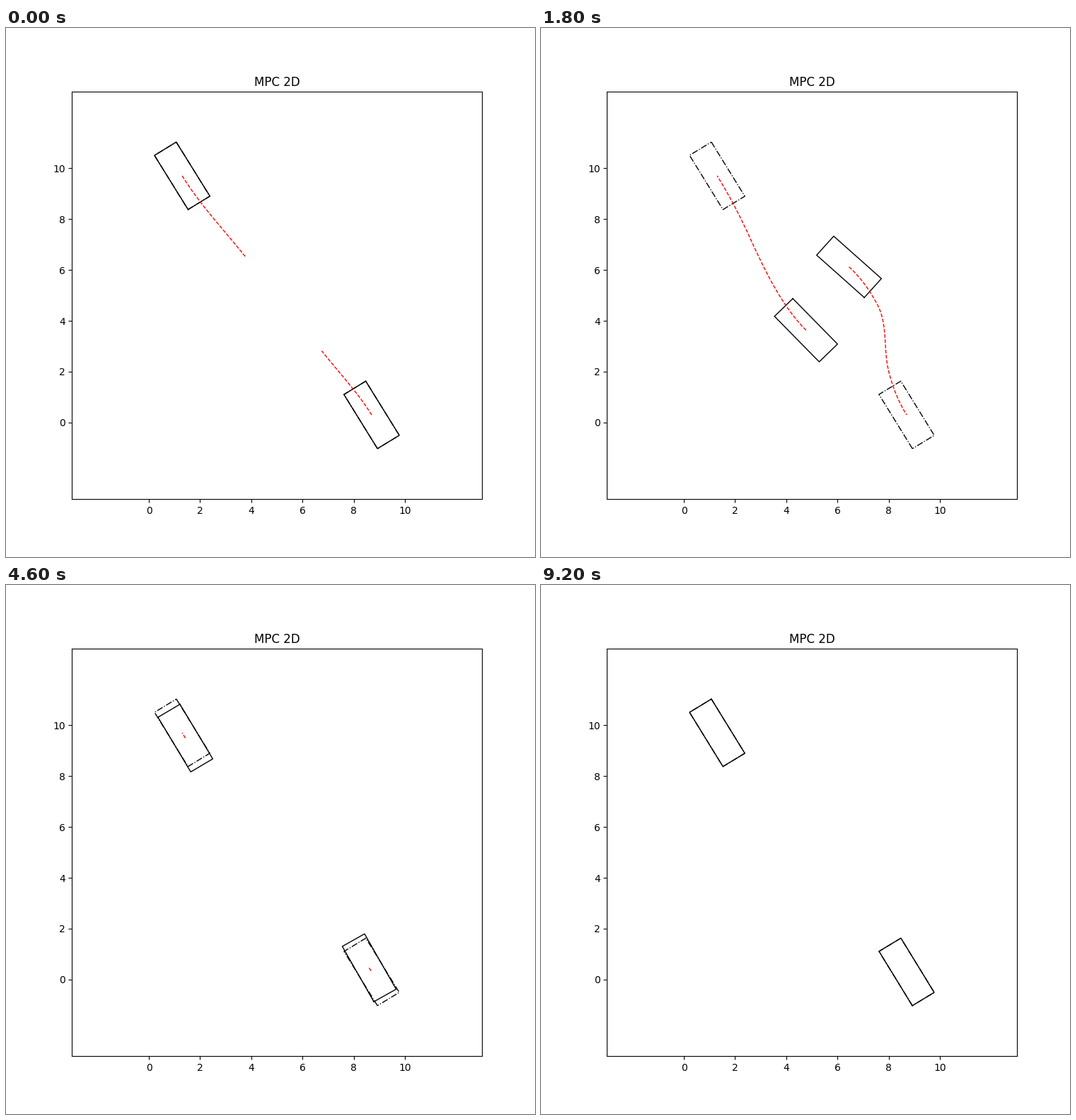
Recreate the animation shown at these times as a matplotlib script. Size 748 by 748 pixels, loop 10000 ms.

```python
import numpy as np
import matplotlib.pyplot as plt
from matplotlib.animation import FuncAnimation

SIZE, FRAMES, STEP_MS = 748, 100, 100
LENGTH, WIDTH = 2.5, 1.0
DECAY = 0.13            # share of the remaining way covered per step
HORIZON_GROWTH = 0.104  # plan growth per step, relative to the first plan


def hermite(a, b, da, db, u):
    return ((2 * u**3 - 3 * u**2 + 1) * a + (u**3 - 2 * u**2 + u) * da
            + (3 * u**2 - 2 * u**3) * b + (u**3 - u**2) * db)


class Path:
    """Smooth curve through (x, y, heading) poses, addressed by arc length."""

    def __init__(self, poses, samples=60):
        p = np.array(poses, float)
        angle = np.radians(p[:, 2:])
        p, tangent = p[:, :2], np.hstack([np.cos(angle), np.sin(angle)])
        chord = np.hypot(*np.diff(p, axis=0).T)
        u = np.linspace(0, 1, samples, endpoint=False)[:, None]
        parts = [hermite(p[i], p[i + 1], tangent[i] * h, tangent[i + 1] * h, u)
                 for i, h in enumerate(chord)]
        self.xy = np.vstack(parts + [p[-1:]])
        self.s = np.append(0, np.cumsum(np.hypot(*np.diff(self.xy, axis=0).T)))
        self.total = self.s[-1]
        self.arcs = self.s[::samples]

    def at(self, s):
        return np.column_stack([np.interp(s, self.s, v) for v in self.xy.T])

    def heading(self, s):
        s = np.clip(s, 0.02, self.total - 0.02)
        (x0, y0), (x1, y1) = self.at([s - 0.02, s + 0.02])
        return np.arctan2(y1 - y0, x1 - x0)


class Robot:
    """Drives through (step, x, y, heading) keys, then settles on its goal."""

    def __init__(self, keys, goal, first_end, bend=None):
        self.steps = [k[0] for k in keys]
        poses = [k[1:] for k in keys]
        self.path = Path(poses + [goal])
        self.early = Path(poses[:3] + [bend, goal]) if bend else self.path
        self.first = Path([poses[0], first_end])
        self.arcs = self.path.arcs[:-1]
        self.rest = self.path.total - self.arcs[-1]
        self.speed = np.gradient(self.arcs, self.steps)
        self.speed[0], self.speed[-1] = 0, DECAY * self.rest

    def travelled(self, t):
        late = t - self.steps[-1]
        if late >= 0:
            return self.path.total - self.rest * np.exp(-DECAY * late)
        i = np.searchsorted(self.steps, t, side="right") - 1
        h = self.steps[i + 1] - self.steps[i]
        return hermite(self.arcs[i], self.arcs[i + 1], self.speed[i] * h,
                       self.speed[i + 1] * h, (t - self.steps[i]) / h)

    def pose(self, t):
        s = self.travelled(t)
        return self.path.at([s])[0], self.path.heading(s)

    def plan(self, t):
        s = self.travelled(t)
        if self.path.total - s < 0.003:
            return np.empty((0, 2))
        u = np.linspace(0, 1, 60)
        reach = self.first.total * (1 + HORIZON_GROWTH * t)

        def ahead(path):
            return path.at(s + u * min(reach, path.total - s))

        early = np.clip((18 - t) / 10, 0, 1)
        curve = early * ahead(self.early) + (1 - early) * ahead(self.path)
        straight = self.first.at(u * self.first.total)
        straight += self.path.at([s])[0] - straight[0]
        naive = max(0, 1 - t / 6)
        return naive * straight + (1 - naive) * curve


def outline(center, angle):
    x = LENGTH / 2 * np.array([1, -1, -1, 1, 1])
    y = WIDTH / 2 * np.array([-1, -1, 1, 1, -1])
    c, s = np.cos(angle), np.sin(angle)
    return center[0] + c * x - s * y, center[1] + s * x + c * y


TILT = -58.5
NW, SE = (1.3, 9.7), (8.7, 0.3)

robots = (
    Robot([(0, *NW, TILT), (8, 2.23, 8.63, -40), (18, 6.45, 6.12, -42),
           (22, 7.56, 4.63, -62), (28, 7.98, 2.1, -77.4)],
          goal=(*SE, TILT), first_end=(3.76, 6.53, -51.5)),
    Robot([(0, *SE, TILT + 180), (8, 8.0, 1.19, 137), (18, 4.77, 3.63, 134.3),
           (28, 2.48, 7.48, 114.7)],
          goal=(*NW, TILT + 180), first_end=(6.75, 2.82, 128),
          bend=(4.05, 5.24, 103)),
)

fig, ax = plt.subplots(figsize=(SIZE / 100, SIZE / 100), dpi=100)
inner = 747.4 / SIZE    # the layout is a fraction of a pixel under the stage
fig.subplots_adjust(left=0.125 * inner, right=0.9 * inner,
                    bottom=0.11 * inner, top=0.88 * inner)
ax.set(xlim=(-3, 13), ylim=(-3, 13), title="MPC 2D",
       xticks=range(0, 11, 2), yticks=range(0, 11, 2))

for spot, turn in ((SE, 0), (NW, 180)):
    ax.plot(*outline(spot, np.radians(TILT + turn)), "k-.", lw=1)
bodies = [ax.plot([], [], "k-", lw=1)[0] for _ in robots]
plans = [ax.plot([], [], "r--", lw=1)[0] for _ in robots]


def update(t):
    for robot, body, plan in zip(robots, bodies, plans):
        body.set_data(*outline(*robot.pose(t)))
        plan.set_data(*robot.plan(t).T)
    return bodies + plans


anim = FuncAnimation(fig, update, frames=FRAMES, interval=STEP_MS,
                     repeat=True, repeat_delay=0)
plt.show()
```
